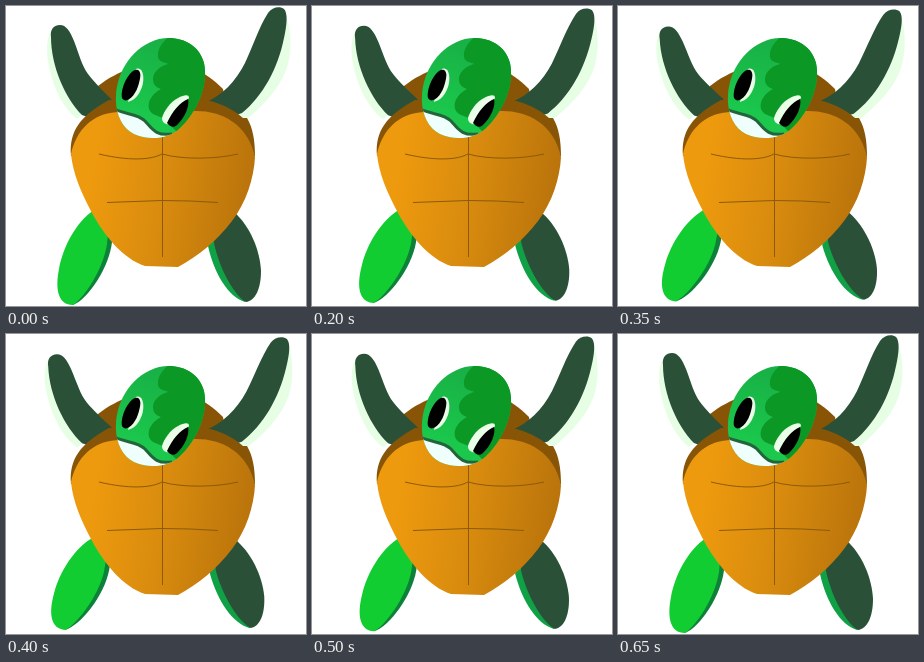
These frames come from a looping animation (300 px wide and 300 px high, 700 ms). An HTML page:

```html
<!DOCTYPE html>
<html lang="en">
<head>
<meta charset="utf-8">
<title>Swimming turtle</title>
<style>
html, body { margin: 0; width: 100%; height: 100%; overflow: hidden; background: #fff; }
svg { display: block; width: 100vw; height: 100vh; }
</style>
</head>
<body>
<svg viewBox="0 0 300 300">
  <defs>
    <linearGradient id="belly" gradientUnits="userSpaceOnUse" x1="85" y1="170" x2="249" y2="195">
      <stop offset="0" stop-color="#ee9a0e"/>
      <stop offset=".45" stop-color="#d88b0e"/>
      <stop offset="1" stop-color="#b8720b"/>
    </linearGradient>
    <linearGradient id="skin" gradientUnits="userSpaceOnUse" x1="150" y1="38" x2="128" y2="108">
      <stop offset="0" stop-color="#18b146"/>
      <stop offset="1" stop-color="#1bc84c"/>
    </linearGradient>
    <clipPath id="face"><path id="skull" d="M153 33C174 29 193 38 198 57C203 80 190 107 174 122C163 133 143 135 128 128C116 122 109 107 110 90C111 65 127 40 153 33Z"/></clipPath>
  </defs>

  <path id="hump" fill="#885507" d="M86 112L92 80C102 72 112 67 125 62H185C198 66 208 74 217 83L222 112Z"/>

  <g id="armL">
    <path fill="#e6ffe4" d="M47 22C41 29 40 42 42 55C46 79 56 101 71 113L82 104L58 50Z"/>
    <path fill="#2a5138" d="M45 31C44 23 48 19 54 19C60 19 64 25 68 35C73 48 76 60 82 68C88 76 96 84 106 94L100 118L76 109C59 92 45 60 45 31Z"/>
  </g>
  <g id="armR">
    <path fill="#e6ffe4" d="M280 10C285 22 286 42 282 58C276 80 258 99 240 114L228 105L262 60Z"/>
    <path fill="#2a5138" d="M262 7C266 1 274 0 278 3C282 7 281 19 278 32C272 62 257 90 236 107L205 118L198 97C216 90 230 75 239 57C247 40 253 21 262 7Z"/>
  </g>
  <g id="legL">
    <path fill="#0d8039" d="M67 299C82 293 103 262 106 236L108 215L90 215L62 280Z"/>
    <path fill="#11cd31" d="M88 204C70 216 57 241 53 263C49 283 52 299 67 299C78 292 97 264 101 238L104 205Z"/>
  </g>
  <g id="legR">
    <path fill="#10a045" d="M239 296C222 291 208 267 202 240L202 215L220 220L245 280Z"/>
    <path fill="#2a5138" d="M228 206C244 220 254 244 255 265C255 283 249 295 240 296C229 290 214 265 208 237L207 206Z"/>
  </g>

  <path fill="#885507" d="M65 150C63 125 74 110 103 94H200C214 97 227 103 237 112L241 112C247 122 249 135 249 150Z"/>
  <path fill="url(#belly)" d="M65 148C70 125 86 107 112 106L190 105C216 105 242 118 249 151C248 172 240 197 226 215C211 235 192 250 172 261L139 260C117 253 98 229 86 207C75 186 67 168 65 148Z"/>
  <g fill="none" stroke="#8c5a0a" stroke-width="1">
    <path d="M93 148C114 153 141 156 156 148C177 154 211 153 232 148"/>
    <path d="M101 196.500L156 194.500Q185 194.500 212 196.500"/>
    <path d="M156.500 128V251"/>
  </g>

  <use href="#skull" fill="url(#skin)"/>
  <g clip-path="url(#face)">
    <path fill="#0b9824" d="M166 28C157 35 151 43 152 51C153 57 160 56 162 58C154 60 147 66 147 73C147 80 152 82 155 83C147 87 141 95 143 103C146 111 156 109 160 115L172 127L210 100V25Z"/>
    <path fill="#effffc" d="M108 103C120 109 131 107 139 115C147 124 150 130 166 128L158 140H120Z"/>
    <path fill="none" stroke="#23653b" stroke-width="3" d="M108 103C120 109 131 107 139 115C147 124 150 130 166 128"/>
  </g>
  <path fill="#e9ffe8" d="M130 63C137 60 139 72 136 81C133 89 129 94 122 96Z"/>
  <path d="M132 64C125 61 114 81 116 92C120 99 130 90 133 77C135 70 135 66 132 64Z"/>
  <path fill="#e9ffe8" d="M183 92C183 88 178 89 172 92C164 96 158 105 156 112C156 117 160 119 164 118Z"/>
  <path d="M182 93C174 96 166 106 161 117C164 121 168 122 171 119C179 112 184 99 182 93Z"/>
</svg>
<script>
const STEP = 50, STEPS = 14, PEAK = 7;
// limb id, pivot x, pivot y, swing in degrees
const limbs = [
  ["armL", 85, 105, -2.6],
  ["armR", 215, 100, 2.1],
  ["legL", 100, 200, 5.5],
  ["legR", 205, 200, -3.5]
].map(([id, ...rest]) => [document.getElementById(id), ...rest]);

function draw(ms) {
  const n = Math.floor(ms / STEP) % STEPS;
  const swing = n <= PEAK ? n / PEAK : (STEPS - 1 - n) / (STEPS - 1 - PEAK);
  for (const [el, x, y, deg] of limbs) {
    el.setAttribute("transform", `rotate(${deg * swing} ${x} ${y})`);
  }
}

let start;
function tick(now) {
  start ??= now;
  draw(now - start);
  requestAnimationFrame(tick);
}
draw(0);
requestAnimationFrame(tick);
</script>
</body>
</html>
```
